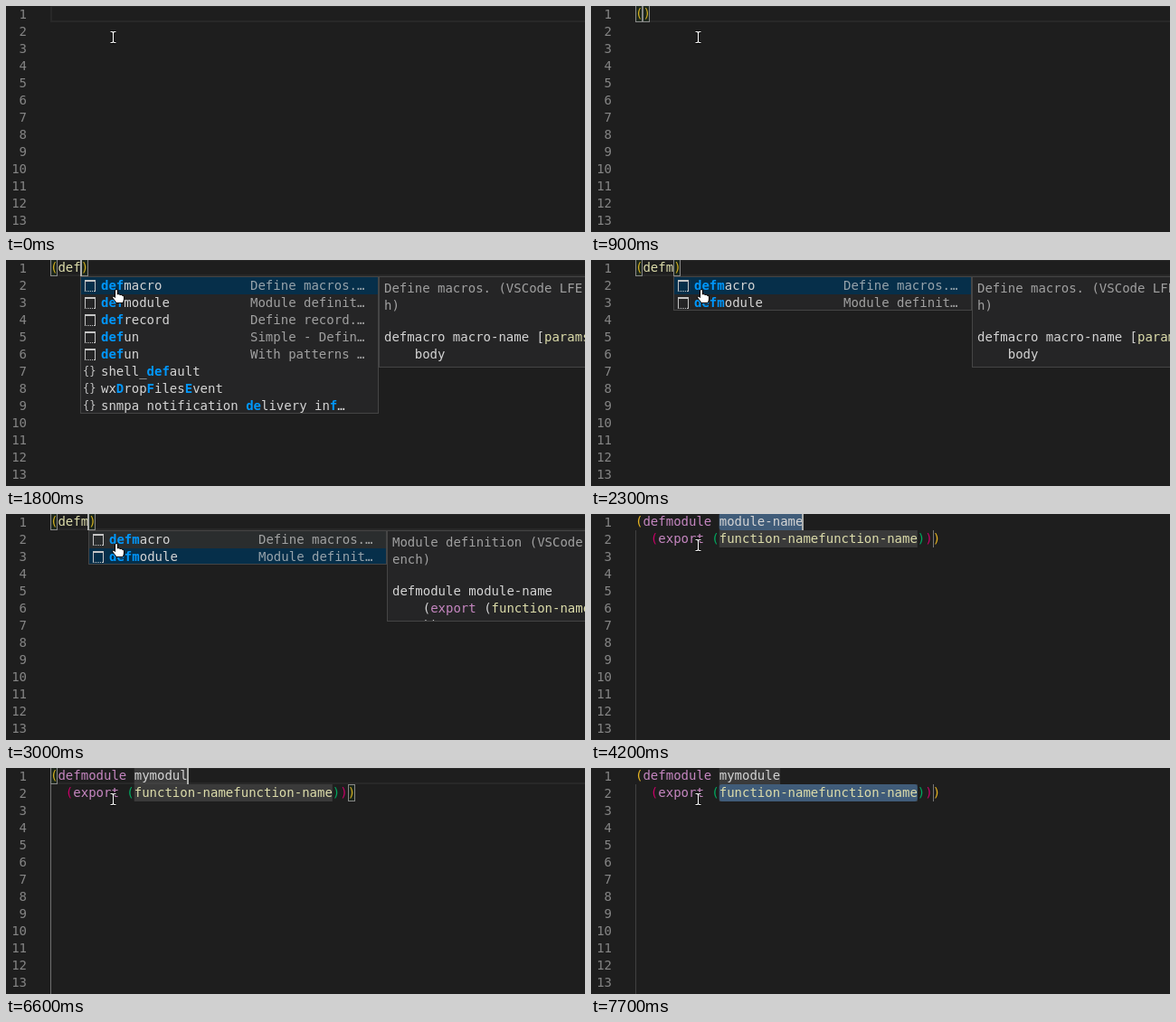
Recreate the animation shown at these times as an HTML page with a canvas. Size 640 by 250 pixels, loop 8 s.

```html
<!DOCTYPE html>
<html lang="en">
<head>
<meta charset="utf-8">
<title>Snippet completion</title>
<style>
html, body { margin: 0; width: 100%; height: 100%; overflow: hidden; background: #1e1e1e; }
canvas { display: block; }
</style>
</head>
<body>
<canvas id="stage" width="640" height="250"></canvas>
<script>
const ctx = document.getElementById('stage').getContext('2d');
const LOOP = 8000, LEFT = 49, ROW = 19, ADV = 8.428;
const FONT = '"DejaVu Sans Mono", monospace';
const FG = '#d4d4d4', KEY = '#c586c0', FN = '#dcdcaa';
const GOLD = '#e6b422', RED = '#c70067', GREEN = '#00a960';
const colX = col => LEFT + col * ADV;

// Suggestions: [label with matches between asterisks, detail]; a detail marks a snippet
const lists = {
  de: { width: 430, detailX: 243, scroll: true, items: [
    ['*de*bugger'], ['*de*ts'],
    ['*de*fmacro', 'Define macros. (VSC…'],
    ['*de*fmodule', 'Module definition (…'],
    ['*de*frecord', 'Define record. (VSC…'],
    ['*de*fun', 'Simple - Defines a …'],
    ['*de*fun', 'With patterns - Def…'],
    ['*d*river_*e*ntry'], ['*d*iam*e*ter'], ['*d*iam*e*ter_app'],
    ['*d*iam*e*ter_codec'], ['*d*iam*e*ter_dict']] },
  def: { width: 330, detailX: 188, items: [
    ['*def*macro', 'Define macros.…'],
    ['*def*module', 'Module definit…'],
    ['*def*record', 'Define record.…'],
    ['*def*un', 'Simple - Defin…'],
    ['*def*un', 'With patterns …'],
    ['shell_*def*ault'], ['wx*D*rop*F*iles*E*vent'],
    ['snmpa_notification_*de*livery_in*f*…']] },
  defm: { width: 330, detailX: 188, items: [
    ['*defm*acro', 'Define macros.…'],
    ['*defm*odule', 'Module definit…']] }
};
const docs = [
  { intro: ['Define macros. (VSCode LFE Workbenc', 'h)'],
    code: [[['defmacro macro-name [', FG], ['params', FN]], [['    body', FG]]] },
  { intro: ['Module definition (VSCode LFE Workb', 'ench)'],
    code: [[['defmodule module-name', FG]],
           [['    (', FG], ['export', KEY], [' (', FG], ['function-name', FN]],
           [['    ))', FG]]] }
];

// Each step changes some properties of the running state
const steps = [
  [0, { word: null, name: null, col: 0, on: false, match: false, list: null, pick: 0,
        doc: false, select: 0, guide: null }],
  [200, { on: true }],
  [400, { word: '', col: 1 }],
  [900, { on: false, match: true }],
  [1300, { word: 'd', col: 2, on: true }],
  [1400, { word: 'de', col: 3, list: 'de' }],
  [1800, { word: 'def', col: 4, list: 'def', doc: true }],
  [1900, { word: 'defm', col: 5, list: 'defm' }],
  [2300, { on: false }],
  [2800, { on: true }],
  [3000, { pick: 1 }],
  [3200, { name: 'module-name', col: 22, list: null, match: false, select: 1 }],
  [3300, { guide: '#404040' }],
  [3700, { on: false }],
  [4200, { on: true }],
  [4600, { name: 'm', col: 12, select: 0, match: true, guide: '#707070' }],
  [4800, { name: 'my', col: 13 }],
  [5300, { on: false }],
  [5700, { name: 'mym', col: 14, on: true }],
  [5900, { name: 'mymo', col: 15 }],
  [6100, { name: 'mymod', col: 16 }],
  [6300, { name: 'mymodu', col: 17 }],
  [6600, { name: 'mymodul', col: 18 }],
  [7000, { name: 'mymodule', col: 19 }],
  [7100, { select: 2 }],
  [7200, { guide: '#404040' }],
  [7500, { match: false }],
  [7700, { on: false }]
];

function rect(x, y, w, h, color) {
  ctx.fillStyle = color;
  ctx.fillRect(x, y, w, h);
}

function frame(x, y, w, h, color) {
  ctx.strokeStyle = color;
  ctx.lineWidth = 1;
  ctx.strokeRect(x + .5, y + .5, w - 1, h - 1);
}

function text(str, x, y, color = FG, style = '14px') {
  ctx.font = style + ' ' + FONT;
  ctx.fillStyle = color;
  ctx.fillText(str, x, y);
}

function runs(parts, x, y) {
  for (const [str, color, style] of parts) {
    text(str, x, y, color, style);
    x += str.length * ADV;
  }
}

function faded(str, x, y) {
  ctx.globalAlpha = .7;
  text(str, x, y);
  ctx.globalAlpha = 1;
}

function clipped(x, y, w, h, draw) {
  ctx.save();
  ctx.beginPath();
  ctx.rect(x, y, w, h);
  ctx.clip();
  draw();
  ctx.restore();
}

function selection(col, len, y) {
  ctx.fillStyle = '#264f78';
  ctx.beginPath();
  ctx.roundRect(colX(col), y, len * ADV, ROW, 3);
  ctx.fill();
}

const placeholder = (col, len, y) =>
  rect(colX(col), y, len * ADV, ROW, 'rgba(124,124,124,.3)');

function matchBox(col, y) {
  const x = Math.round(colX(col));
  rect(x, y, 8, ROW, 'rgba(0,100,0,.1)');
  frame(x, y, 8, ROW, '#888');
}

function caret(col, y) {
  rect(col ? Math.round(colX(col)) - 1 : LEFT, y, 2, ROW, '#aeafad');
}

function snippetIcon(x, y) {
  rect(x, y, 1, 13, '#c5c5c5');
  rect(x + 11, y, 1, 13, '#c5c5c5');
  rect(x, y, 12, 2, '#c5c5c5');
  for (let i = 0; i < 12; i += 2) rect(x + i, y + 12, 1, 1, '#c5c5c5');
}

function drawList(list, x, pick) {
  const { width, detailX, items, scroll } = list, height = items.length * ROW;
  clipped(x, 18, width, height, () => {
    rect(x, 18, width, height, '#252526');
    items.forEach(([label, detail], i) => {
      const y = 19 + i * ROW;
      if (i === pick) rect(x, y, width, ROW, '#062f4a');
      else if (!i) rect(x, y, width, ROW, '#2a2d2e');
      if (detail) {
        snippetIcon(x + 5, y + 3);
        faded(detail, x + detailX, y + 14);
      } else {
        text('{}', x + 3, y + 13, '#c5c5c5', '12px');
      }
      runs(label.split('*').map((s, k) => k % 2 ? [s, '#0097fb', 'bold 14px'] : [s, FG]),
        x + 23, y + 14);
    });
    if (scroll) rect(x + width - 11, 19, 10, 65, 'rgba(121,121,121,.4)');
    frame(x, 18, width, height, '#454545');
  });
}

function drawDoc({ intro, code }, x) {
  clipped(x, 18, 640 - x, 101, () => {
    rect(x, 18, 400, 101, '#252526');
    intro.forEach((line, i) => faded(line, x + 6, 36 + i * ROW));
    code.forEach((line, i) => runs(line, x + 6, 90 + i * ROW));
    frame(x, 18, 400, 101, '#454545');
  });
}

function drawBeam() {
  const path = new Path2D('M115.5 28.5H117.5L118.5 29.5L119.5 28.5H121.5M118.5 29.5V39.5' +
    'M115.5 40.5H117.5L118.5 39.5L119.5 40.5H121.5');
  for (const [color, width] of [['#000', 3], ['#fff', 1.2]]) {
    ctx.strokeStyle = color;
    ctx.lineWidth = width;
    ctx.stroke(path);
  }
}

function drawHand() {
  const path = new Path2D('M120.5 34Q120.5 32.5 122 32.5T123.5 34V38Q125 37 126 38.5' +
    'Q127.5 37.8 128.3 39.2Q130.5 38.8 130.5 41V43Q130.5 45 129 47.5H122' +
    'Q120 44.5 117.8 42Q117 40 119 40L120.5 41.5Z');
  ctx.fillStyle = '#fff';
  ctx.strokeStyle = '#000';
  ctx.lineWidth = 1;
  ctx.fill(path);
  ctx.stroke(path);
}

function draw(s) {
  const top = -1, second = top + ROW;
  rect(0, 0, 640, 250, '#1e1e1e');
  if (!s.select) {
    ctx.strokeStyle = '#282828';
    ctx.lineWidth = 2;
    ctx.strokeRect(LEFT + 1, 0, 620, 17);
  }
  for (let i = 1; i <= 13; i++) {
    const label = String(i);
    text(label, 23 - label.length * ADV, i * ROW - 5, '#858585');
  }
  if (s.guide) rect(LEFT, second, 1, 232, s.guide);

  if (s.name) {
    if (s.select === 1) selection(11, s.name.length, top);
    if (s.select === 2) selection(11, 26, second);
    placeholder(11, s.name.length, top);
    placeholder(11, 26, second);
    rect(378, second, 1, ROW, '#777');
    runs([['(', GOLD], ['defmodule', KEY], [' ' + s.name, FG]], LEFT, 13);
    runs([['  (', RED], ['export', KEY], [' (', GREEN], ['function-namefunction-name', FN],
      [')', GREEN], [')', RED], [')', GOLD]], LEFT, 32);
  } else if (s.word !== null) {
    runs([['(', GOLD], [s.word, FN], [')', GOLD]], LEFT, 13);
  }

  if (s.match) {
    matchBox(0, top);
    if (s.name) matchBox(39, second);
    else matchBox(s.col, top);
  }
  if (s.on) {
    if (s.select === 2) [24, 37].forEach(col => caret(col, second));
    else caret(s.col, top);
  }

  if (s.list) {
    const x = Math.floor(colX(s.col)), list = lists[s.list];
    drawList(list, x, s.pick);
    if (s.doc) drawDoc(docs[s.pick], x + list.width - (s.list === 'def' ? 0 : 0));
    drawHand();
  } else {
    drawBeam();
  }
}

const start = performance.now();
function tick() {
  const t = (performance.now() - start) % LOOP;
  draw(Object.assign({}, ...steps.filter(([at]) => at <= t).map(([, change]) => change)));
  requestAnimationFrame(tick);
}
tick();
</script>
</body>
</html>
```
